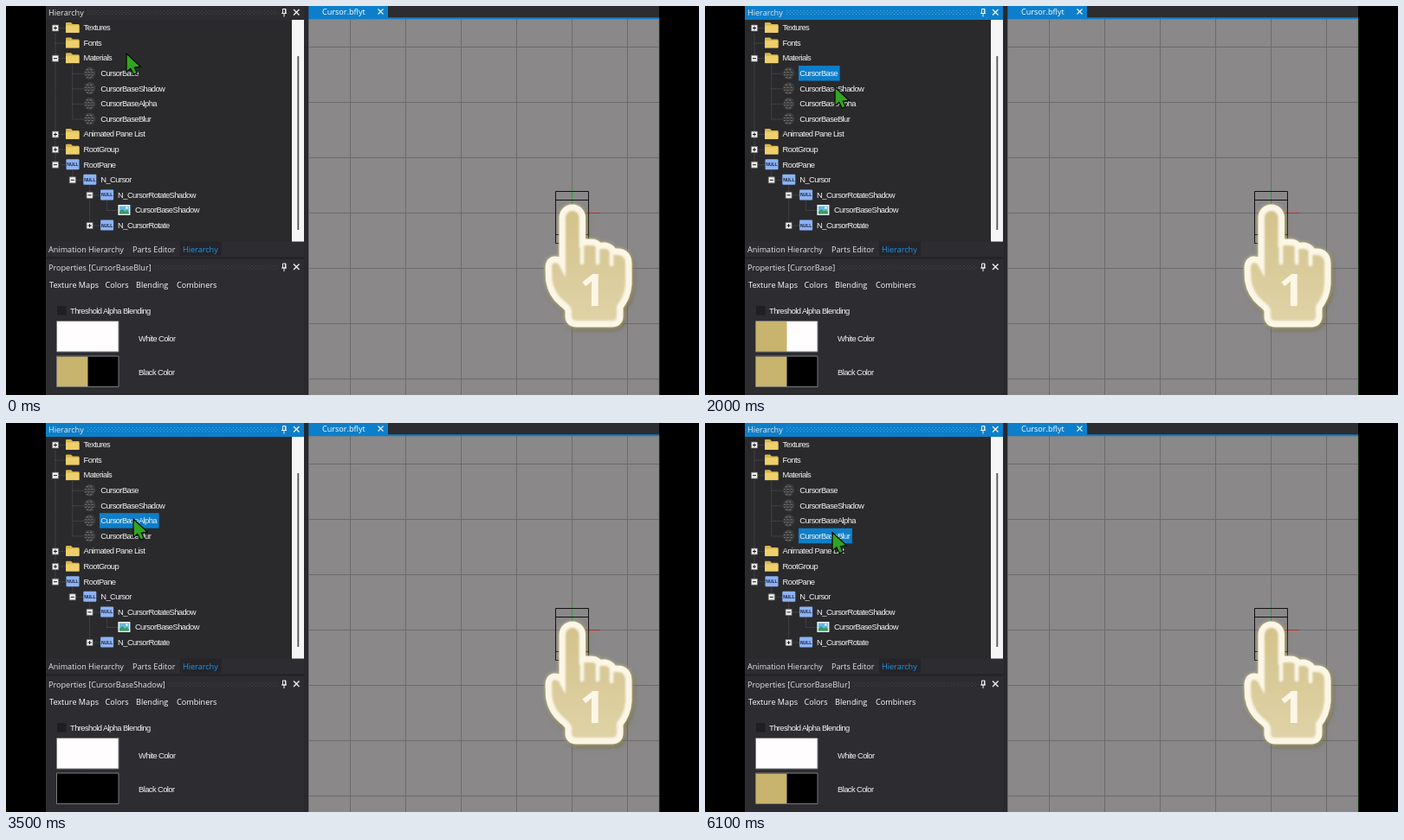
These frames come from a looping animation (800 px wide and 450 px high, 6.2 s). An HTML page:

```html
<!DOCTYPE html>
<html lang="en">
<head>
<meta charset="utf-8">
<style>
html, body { margin: 0; width: 100%; height: 100%; overflow: hidden; background: #000; }
svg { display: block; width: 800px; height: 450px; }
text { font: 9.1px "Open Sans", sans-serif; fill: #e6e6e6; white-space: pre; }
.menu { fill: #fff; }
.small { font: 9.4px "Liberation Sans", Arial, sans-serif; letter-spacing: -.59px; fill: #f4f4f4; }
.null { font: bold 5px "Liberation Sans", Arial, sans-serif; fill: #14213f; text-anchor: middle; }
.digit { font: bold 52px "Open Sans", sans-serif; fill: #fbf6e6; text-anchor: middle; }
.dots { stroke-dasharray: 1 3; fill: none; }
#hand { filter: drop-shadow(0 0 2px #e6d98ecc) drop-shadow(2px 3px 2px #6b613099); }
</style>
</head>
<body>
<svg viewBox="0 0 800 450">
  <defs>
    <linearGradient id="gold" x1="0" y1="0" x2="0" y2="1">
      <stop offset="0" stop-color="#d3c28b"/>
      <stop offset="1" stop-color="#dfd3a7"/>
    </linearGradient>
    <filter id="soft"><feGaussianBlur stdDeviation=".8"/></filter>
    <clipPath id="view"><path d="M46 0H754V450H46Z"/></clipPath>
    <g id="pin" fill="none" stroke="#f0f0f0">
      <path d="M-1.5 -4H2V1H-1.5ZM-3 1H3M0 1V5M1.4 -4V1"/>
      <path d="M11 -3.5L17.5 3M17.5 -3.5L11 3" stroke-width="1.4"/>
    </g>
    <g id="folder">
      <path d="M-8 -5Q-8 -6 -7 -6H-2L0 -4H6.500Q7.500 -4 7.500 -3V5.500H-8Z" fill="#d9b649"/>
      <path d="M-8 -2.500H7.500V6H-8Z" fill="#edcf6c"/>
    </g>
    <g id="ball">
      <ellipse rx="6.300" ry="7" fill="#434343"/>
      <path d="M-4 -4H4M-6 -1H6M-6 2H6M-4 5H4" stroke="#777" stroke-dasharray="2 2"/>
      <path d="M-5 -2.500H5M-6 .5H6M-5 3.500H5" stroke="#222" stroke-dasharray="2 2"/>
    </g>
    <g id="null">
      <rect x="-7.500" y="-6" width="15" height="12" rx="1" fill="#8db2f3"/>
      <text class="null" y="2">NULL</text>
    </g>
    <g id="image">
      <path d="M-7 -6H7V6H-7Z" fill="#f4f8fa"/>
      <path d="M-5.500 -4.500H5.500V4.500H-5.500Z" fill="#62b8e6"/>
      <path d="M-5.500 4.500V2L-2 -1L1 2L3 0L5.500 2.500V4.500Z" fill="#3c9a57"/>
      <circle cx="3" cy="-2.500" r="1.300" fill="#fff"/>
    </g>
    <path id="palm" d="M646 245A7.800 8 0 0 1 661.600 245V280Q664 277 668 277H676Q681 277 683 282Q685 280.500 692 281Q697 282 699 288H706Q715 288 715 298V322Q714 336 705 347V359Q705 364 700 364H658Q653 364 653 359V352Q652 347 644 341Q633 332 630.500 317L630 303Q630 297 634 297Q638 297 640 303L646 314Z"/>
  </defs>

  <rect width="800" height="450" fill="#000"/>
  <g clip-path="url(#view)">
    <rect x="46" width="708" height="450" fill="#2d2c30"/>
    <rect x="46" y="16" width="284" height="256.500" fill="#2a2a2d"/>
    <rect x="330" y="16" width="14" height="256.500" fill="#f5f5f5"/>
    <path d="M337.300 58V259" stroke="#555" stroke-width="1.800"/>
    <rect id="head" x="46" width="298" height="16"/>
    <path id="headDots" class="dots" d="M94 5.500H314M96 7.500H314M94 9.500H314"/>
    <text x="49" y="11">Hierarchy</text>
    <use href="#pin" x="321" y="7.500"/>
    <g id="tree"></g>

    <rect x="201" y="272.500" width="48" height="16.500" fill="#252428"/>
    <text x="49" y="284.500">Animation Hierarchy</text>
    <text x="146" y="284.500">Parts Editor</text>
    <text x="204" y="284.500" style="fill:#1c97ea">Hierarchy</text>
    <path d="M46 291.500H344" stroke="#252427" stroke-width="3"/>

    <path id="titleDots" class="dots" stroke="#454449"/>
    <text id="title" x="49" y="305.800"></text>
    <use href="#pin" x="321" y="302"/>
    <text class="menu" x="50" y="326.300">Texture Maps</text>
    <text class="menu" x="114.500" y="326.300">Colors</text>
    <text class="menu" x="150" y="326.300">Blending</text>
    <text class="menu" x="197" y="326.300">Combiners</text>
    <rect x="59" y="347" width="10.500" height="10.500" fill="#1f1e21"/>
    <text class="small" x="74" y="355.600">Threshold Alpha Blending</text>
    <text class="small" x="153" y="388.300">White Color</text>
    <text class="small" x="153" y="426.800">Black Color</text>
    <path d="M59 365H130V400H59Z" fill="#fffdfe"/>
    <path d="M59 405.500H130V440.500H59Z" fill="#000"/>
    <path id="white" d="M59 365H94.500V400H59Z"/>
    <path id="black" d="M59 405.500H94.500V440.500H59Z"/>
    <path d="M58.500 364.500H130V400H58.500ZM58.500 405H130V440.500H58.500Z" fill="none" stroke="#7b7a7c"/>

    <path d="M344 0H349.300V450H344Z" fill="#29282c"/>
    <rect x="349.300" y="15" width="404.700" height="435" fill="#8a8889"/>
    <path d="M349.300 0H441V13.300H754V15.200H349.300Z" fill="#0d7fca"/>
    <text class="menu" x="365" y="10">Cursor.bflyt</text>
    <path d="M429.500 3.500L435.500 9.500M435.500 3.500L429.500 9.500" stroke="#e4f1fb" stroke-width="1.200"/>
    <path id="grid" stroke="#6c6b6b"/>
    <path d="M653.500 209V239" stroke="#2e9a3a"/>
    <path d="M653 239.500H686" stroke="#b3332c"/>
    <path d="M634.500 214.500H672.500V274.500H634.500ZM634.500 224.500H672.500M634.500 264.500H672.500" fill="none" stroke="#111"/>

    <g id="hand">
      <use href="#palm" fill="#fbf6e6" stroke="#fbf6e6" stroke-width="15" stroke-linejoin="round"/>
      <g filter="url(#soft)">
        <use href="#palm" fill="url(#gold)"/>
        <path d="M665 275V297M683 277V297M699 282V299" stroke="#fbf6e6" stroke-width="4.500" stroke-linecap="round"/>
      </g>
      <text class="digit" x="677" y="347">1</text>
    </g>
    <path id="arrow" d="M0 0V21.500L4.800 17.300L8.300 24.300L12.300 22.500L9.300 16.200L16.500 15.200Z" fill="#31a520" stroke="#0a1207" stroke-width="1.400" stroke-linejoin="round"/>
  </g>
  <path d="M754.300 15V450" stroke="#1f5a1f" stroke-width=".6"/>
</svg>
<script>
const $ = id => document.getElementById(id);
const GOLD = '#c8b46c';
const LOOP = 6200, STEP = 100;

// label, depth, icon, expander sign
const rows = [
  ['Textures', 0, 'folder', '+'], ['Fonts', 0, 'folder', ''], ['Materials', 0, 'folder', '-'],
  ['CursorBase', 1, 'ball', ''], ['CursorBaseShadow', 1, 'ball', ''],
  ['CursorBaseAlpha', 1, 'ball', ''], ['CursorBaseBlur', 1, 'ball', ''],
  ['Animated Pane List', 0, 'folder', '+'], ['RootGroup', 0, 'folder', '+'],
  ['RootPane', 0, 'null', '-'], ['N_Cursor', 1, 'null', '-'],
  ['N_CursorRotateShadow', 2, 'null', '-'], ['CursorBaseShadow', 3, 'image', ''],
  ['N_CursorRotate', 2, 'null', '+']
];
const rowY = i => 25 + i * 17.58;

function rowMarkup([label, depth, icon, sign], i) {
  const x = 57 + depth * 19.8, y = rowY(i);
  const box = sign && `<path d="M${x - 3.5} ${y - 3}h7v7h-7z" fill="#f2f2f2" stroke="#777" stroke-width=".7"/>
    <path d="M${x - 2} ${y + .5}h4${sign === '+' ? `M${x} ${y - 1.5}v4` : ''}" stroke="#111"/>`;
  return `<path d="M${x} ${y + .5}h13" stroke="#555" stroke-dasharray="1 1"/>${box}
    <use href="#${icon}" x="${x + 20}" y="${y}"/>
    <text class="small" x="${x + 32.5}" y="${y + 3.3}">${label}</text>`;
}

// column depth, first row, last row
const links = [[0, 0, 9], [1, 2, 6], [1, 9, 10], [2, 10, 13], [3, 11, 12]]
  .map(([d, a, b]) => `M${57 + d * 19.8} ${rowY(a) + 7}V${rowY(b)}`).join('');
$('tree').innerHTML = `<path d="${links}" stroke="#555" stroke-dasharray="1 1"/>
  <rect id="pick" x="108" height="17.500" fill="#0d7fca"/>` + rows.map(rowMarkup).join('');
const labels = document.querySelectorAll('#tree .small');

let lines = '';
for (let x = 397.5; x < 754; x += 64) lines += `M${x} 15V450`;
for (let y = 47.5; y < 450; y += 64) lines += `M349.3 ${y}H754`;
$('grid').setAttribute('d', lines);

// pointer moves: start, end, x, y
const moves = [[0, 0, 139, 55], [100, 500, 137, 71], [1300, 1900, 150, 94],
  [2700, 3300, 147, 111], [4200, 4700, 147, 126.5]];
// selection time, properties time, row, left halves of both swatches
const picks = [[-1, -1, 6, '#fffdfe', GOLD], [600, 700, 3, GOLD, GOLD],
  [2200, 2400, 4, '#fffdfe', '#000'], [3400, 3700, 5, '#fffdfe', GOLD],
  [5200, 5300, 6, '#fffdfe', GOLD]];

function pointerAt(t) {
  let px = 139, py = 55;
  for (const [from, to, x, y] of moves) {
    if (t < from) break;
    const k = to > from ? Math.min(1, (t - from) / (to - from)) : 1;
    const e = k * k * (3 - 2 * k);
    px += (x - px) * e;
    py += (y - py) * e;
  }
  return [px, py];
}

function draw(t) {
  const picked = picks.findLast(p => p[0] <= t);
  const shown = picks.findLast(p => p[1] <= t);
  const active = picked[0] >= 0;
  $('head').setAttribute('fill', active ? '#0d7fca' : '#2d2c30');
  $('headDots').setAttribute('stroke', active ? '#4ba4dc' : '#454449');
  $('pick').setAttribute('y', rowY(picked[2]) - 8.7);
  $('pick').setAttribute('width', active ? labels[picked[2]].getComputedTextLength() + 4 : 0);
  $('title').textContent = `Properties [${rows[shown[2]][0]}]`;
  const x = 53 + $('title').getComputedTextLength();
  $('titleDots').setAttribute('d', `M${x} 300.5H314M${x + 2} 302.5H314M${x} 304.5H314`);
  $('white').setAttribute('fill', shown[3]);
  $('black').setAttribute('fill', shown[4]);
  $('arrow').setAttribute('transform', `translate(${pointerAt(t)})`);
}

const start = performance.now();
function tick() {
  const t = (performance.now() - start) % LOOP;
  draw(Math.floor(t / STEP) * STEP);
  requestAnimationFrame(tick);
}
tick();
</script>
</body>
</html>
```
